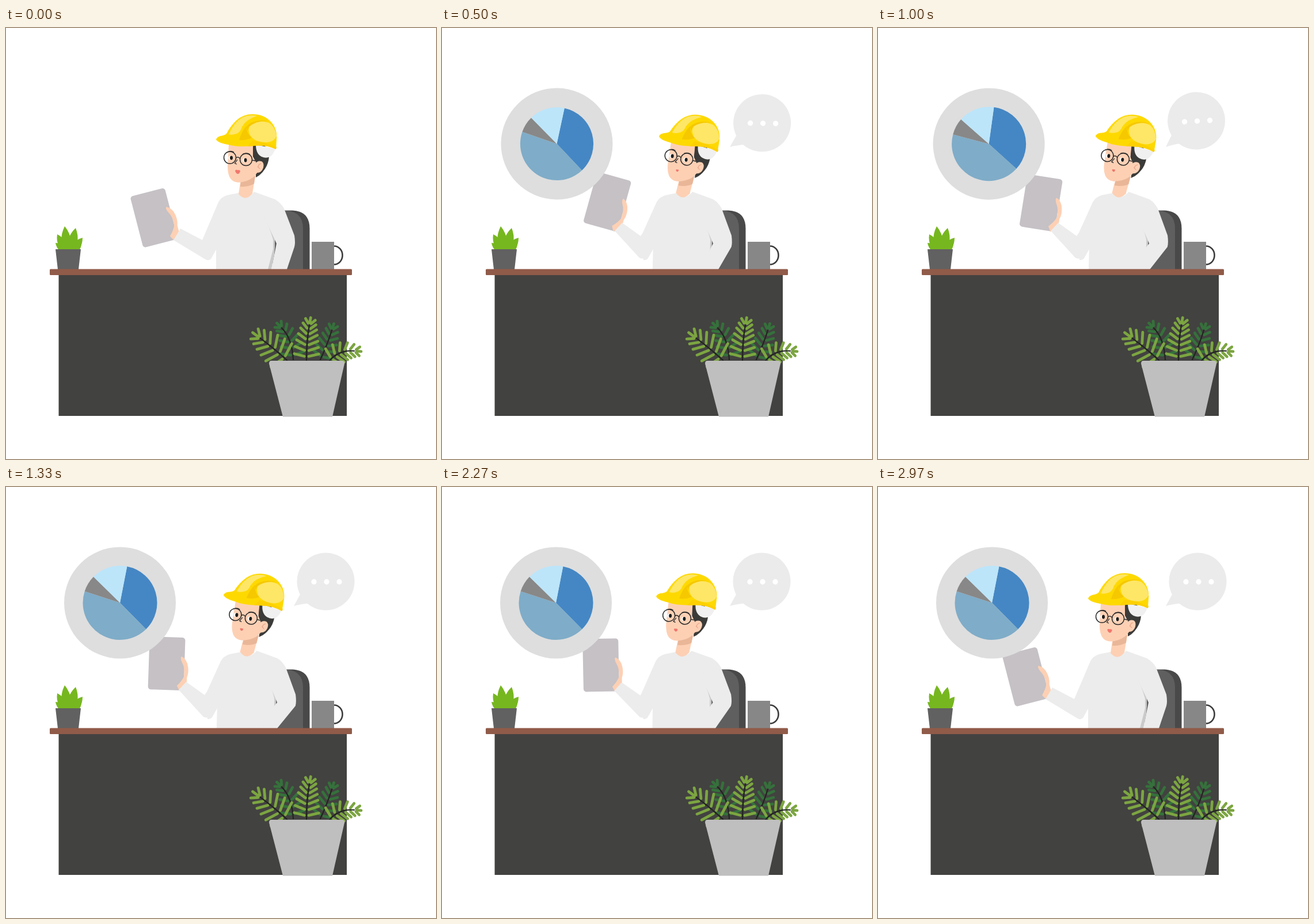
Animation, 747 px wide and 750 px high, one loop 3.01 s. Source, as an HTML page:

```html
<!DOCTYPE html>
<html lang="en">
<head>
<meta charset="utf-8">
<title>Engineer at a desk</title>
<style>
  html, body { margin: 0; width: 100%; height: 100%; overflow: hidden; background: #fff; }
  svg { display: block; width: 100vw; height: 100vh; }
</style>
</head>
<body>
<svg viewBox="0 0 747 750" xmlns="http://www.w3.org/2000/svg">
  <defs><clipPath id="chartClip"><path d="M71 0H747V750H71z"/></clipPath></defs>

  <g id="chair">
    <path d="M483 317.500H498Q527.500 319 527.500 349V420H483z" fill="#494949"/>
    <path d="M463 420V345Q465 318 486 318Q516 319 516 349V420z" fill="#5f5f5f"/>
  </g>

  <g id="hand">
    <rect x="247" y="262" width="62" height="92" rx="5" fill="#c5c1c5"/>
    <path d="M303 295Q310 297 314 307Q318 320 314 331L314 342L302 355L297 346Q306 337 309 329Q310 314 305 306Q301 299 303 295z" fill="#fdd0b4"/>
  </g>

  <g id="torso">
    <path d="M446 324L467 366V382L466 395L461 420H440z" fill="#cacaca"/>
    <path d="M404 287L384 291Q374 294 369 303L341 369L349 404Q355 404 357 400L365 385V420H455L464 385V368Q458 346 446 324L482 318Q478 304 467 298L431 285Q418 301 404 287z" fill="#ececec"/>
  </g>
  <path id="forearm" fill="#ececec"/>
  <path id="sleeve" fill="#ececec"/>

  <g id="head">
    <path d="M408 262L404 289Q416 303 428 288L433 257z" fill="#fdd0b4"/>
    <path d="M408 266L433 257L431 271Q421 277 407 276z" fill="#e9b698"/>
    <path d="M428 203L429 224L434 234L434 260Q443 256 450 245Q456 236 457 224L450 205z" fill="#3b3b39"/>
    <path d="M387 202L385 240Q385 262 396 267Q404 271 418 266Q432 261 437 250L434 233L429 224V203z" fill="#fdd0b4"/>
    <path d="M433 236Q437 230 444 232Q449 235 447 243Q444 252 436 252L433 255z" fill="#fdd0b4"/>
    <path d="M443 236Q438 237 438 243M437 241L441 245" fill="none" stroke="#e9a98d" stroke-width="1.3"/>
    <path d="M434 203Q434 219 444 224Q453 228 460 223Q465 219 468 210z" fill="#f0f0f0"/>

    <g id="eyesOpen">
      <ellipse cx="390" cy="226" rx="3.500" ry="3.500" fill="#fff"/>
      <ellipse cx="414.500" cy="230" rx="3.500" ry="3.500" fill="#fff"/>
      <ellipse cx="391.500" cy="226" rx="2.500" ry="3.400" fill="#1d1d1b"/>
      <ellipse cx="416" cy="230" rx="2.500" ry="3.400" fill="#1d1d1b"/>
    </g>
    <path id="eyesShut" d="M387 227Q391 230 395 228M411 231Q415 234 420 232" fill="none" stroke="#2b2b2b" stroke-width="1.5"/>
    <g fill="none" stroke="#2b2b2b" stroke-width="1.500">
      <circle cx="389" cy="225.500" r="10.500"/>
      <circle cx="417" cy="229" r="10.500"/>
      <path d="M399.500 226Q403 223 406.500 227M427.500 230L433 231"/>
      <path d="M402 229L397.500 235.500L401 237" stroke-width="1.300"/>
      <path d="M384 216.500Q390 212.500 396 216M411 219.500Q418 216 424 220" stroke-width="1.200"/>
    </g>
    <path id="mouth" d="M-4.500 -2Q-2 -4 0 -2.500Q3 -4 4.500 -1Q3 4 0 4Q-3.500 3 -4.500 -2z" fill="#f1776d"/>

    <path d="M365 194Q366 190 372 188Q379 187 383 184Q390 170 401 160Q413 150 428 150Q448 150 460 163Q472 176 470 194L469 211Q452 203 432 205Q402 208 386 203Q368 200 365 194z" fill="#fed900"/>
    <path d="M387 185Q396 164 410 156Q422 150 436 153Q417 159 410 172Q407 182 400 184Q392 187 387 185z" fill="#fee667"/>
    <path d="M425 188Q417 174 428 167Q441 159 457 165Q468 172 470 188Q466 198 453 199Q433 199 425 188z" fill="#fee667"/>
    <path d="M405 195Q409 181 417 171Q418 184 427 191Q417 196 405 195z" fill="#f5c800"/>
    <path d="M417 172Q430 157 458 162Q436 160 422 172Q419 178 421 182z" fill="#f5c800"/>
    <path d="M428 196Q452 199 470 207L469 211Q452 203 432 205L420 206z" fill="#fdd000"/>
  </g>

  <path d="M570 379.500A14.500 16 0 0 1 570 411.500" fill="none" stroke="#3b3b3b" stroke-width="2.600"/>
  <rect x="531" y="372" width="39" height="48" fill="#878787"/>

  <g id="succulent"></g>
  <path d="M86 385H130L126 420H90z" fill="#616161"/>

  <rect x="91.500" y="428" width="500.500" height="247" fill="#424240"/>
  <rect x="76" y="419.500" width="525" height="10.500" rx="1.500" fill="#905b49"/>

  <g id="ferns" fill="none" stroke-linecap="round"></g>
  <path d="M461 579H584Q589 579 588 584L567 676.500H481L457 584Q457 579 461 579z" fill="#bfbfbf"/>

  <g clip-path="url(#chartClip)">
    <g id="chart">
      <circle cy="-97.500" r="97" fill="#dedede"/>
      <g id="pie"></g>
    </g>
  </g>

  <g id="bubble">
    <circle cx="55.500" cy="-42.500" r="50" fill="#ebebeb"/>
    <path d="M0 0L11 -20L30 -5Q15 -4 0 0z" fill="#ebebeb"/>
    <g fill="#fff">
      <circle cx="35" cy="-42" r="4.700"/><circle cx="57" cy="-42" r="4.700"/><circle cx="79" cy="-42" r="4.700"/>
    </g>
  </g>
</svg>

<script>
const LOOP = 3010;
const el = id => document.getElementById(id);
const set = (id, name, value) => el(id).setAttribute(name, value);

function add(parent, attrs) {
  const path = document.createElementNS('http://www.w3.org/2000/svg', 'path');
  for (const name in attrs) path.setAttribute(name, attrs[name]);
  el(parent).append(path);
}

const mix = (a, b, p) => a + (b - a) * p;
const ramp = (t, from, to) => Math.min(1, Math.max(0, (t - from) / (to - from)));
const ease = (t, from, to) => { const p = ramp(t, from, to); return p * p * (3 - 2 * p); };

// Eased value through [time, value] keys.
function track(t, keys) {
  let value = keys[0][1];
  for (let i = 1; i < keys.length; i++) {
    value += (keys[i][1] - keys[i - 1][1]) * ease(t, keys[i - 1][0], keys[i][0]);
  }
  return value;
}

function addLeaf(x, y, tipX, tipY, width) {
  const dx = tipX - x, dy = tipY - y, len = Math.hypot(dx, dy);
  const nx = -dy / len * width, ny = dx / len * width;
  const mx = x + dx * 0.5, my = y + dy * 0.5;
  add('succulent', {
    d: `M${x} ${y}Q${mx + nx} ${my + ny} ${tipX} ${tipY}Q${mx - nx} ${my - ny} ${x} ${y}z`,
    fill: '#76b71f'
  });
}

// A curved stem with pairs of leaflets that lean more towards the tip as they near it.
function addFern([x0, y0, cx, cy, x1, y1], color, size, pairs) {
  let d = '';
  for (let i = 0; i <= pairs; i++) {
    const p = 0.1 + 0.9 * i / pairs, q = 1 - p;
    const x = q * q * x0 + 2 * q * p * cx + p * p * x1;
    const y = q * q * y0 + 2 * q * p * cy + p * p * y1;
    const dir = Math.atan2(q * (cy - y0) + p * (y1 - cy), q * (cx - x0) + p * (x1 - cx));
    const len = size * (1 - 0.4 * p * p);
    const lean = 1.4 - 0.7 * p;
    for (const a of i === pairs ? [-lean, 0, lean] : [-lean, lean]) {
      const ux = Math.cos(dir + a), uy = Math.sin(dir + a);
      d += `M${x + ux * 4} ${y + uy * 4}L${x + ux * len} ${y + uy * len}`;
    }
  }
  add('ferns', { d, stroke: color, 'stroke-width': 4.8 });
  add('ferns', { d: `M${x0} ${y0}Q${cx} ${cy} ${x1} ${y1}`, stroke: '#20231d', 'stroke-width': 2 });
}

function addSlice(from, to, fill) {
  const r = 64.5;
  const point = deg => `${r * Math.sin(deg * Math.PI / 180)} ${-r * Math.cos(deg * Math.PI / 180)}`;
  add('pie', { d: `M0 0L${point(from)}A${r} ${r} 0 0 1 ${point(to)}z`, fill });
}

addLeaf(107, 394, 89, 359, 14);
addLeaf(107, 394, 102, 345, 16);
addLeaf(111, 394, 121, 348, 16);
addLeaf(111, 394, 133, 365, 14);
addLeaf(107, 392, 86, 374, 11);
addLeaf(113, 392, 131, 376, 11);

const DARK = '#35713b', LIGHT = '#7ca541';
addFern([499, 577, 497, 540, 479, 522], DARK, 20, 5);
addFern([546, 577, 558, 552, 566, 526], DARK, 20, 5);
addFern([488, 578, 465, 557, 442, 540], LIGHT, 28, 5);
addFern([522, 579, 522, 545, 527, 517], LIGHT, 22, 6);
addFern([562, 579, 578, 560, 605, 562], LIGHT, 20, 5);

addSlice(11, 135.5, '#4587c4');
addSlice(135.5, 288, '#7facc8');
addSlice(288, 314.5, '#888');
addSlice(314.5, 371, '#bce5fa');

function draw(ms) {
  const t = ms / 1000;
  const lean = track(t, [[0, 0], [0.6, 1], [1.64, 1], [3, 0]]);
  const reach = track(t, [[0, 0], [0.52, 1], [2.1, 1], [3, 0]]);
  const tuck = ramp(t, 0, 1.08) * (1 - ease(t, 1.95, 3));
  const tilt = track(t, [[0, -14.5], [0.54, 16], [1.55, 0], [2.12, 0], [3, -14.5]]);

  const skew = -0.028 * lean;
  set('torso', 'transform', `matrix(1 0 ${skew} 1 ${-skew * 450} 0)`);
  set('head', 'transform', `rotate(${6.1 * lean} 427 312)`);
  set('hand', 'transform',
    `translate(${mix(-14, 0, reach)} ${mix(15, 0, reach)}) rotate(${tilt} 303 339)`);

  const m = (a, b) => mix(a, b, reach);
  set('forearm', 'd', `M${m(303, 313)} ${m(349, 339)}L${m(341, 345)} ${m(369, 362)}L368 330V380` +
    `L${m(358, 360)} ${m(398, 396)}Q${m(354, 352)} ${m(406, 404)} ${m(347, 343)} ${m(403, 400)}` +
    `L${m(291, 300)} ${m(369, 353)}z`);

  const s = 3 * lean;
  set('sleeve', 'd', `M${446 + s} 324L${470 + s * 0.4} 375L${mix(461, 432, tuck)} 420H${mix(488, 471, tuck)}` +
    `L${501 + s * 0.6} 381Q${503 + s * 0.6} 374 ${501 + s * 0.7} 361L${483 + s} 314` +
    `Q${478 + s} 304 ${467 + s} 299z`);

  const shut = t > 1.9 && t < 2.05;
  set('eyesOpen', 'visibility', shut ? 'hidden' : 'visible');
  set('eyesShut', 'visibility', shut ? 'visible' : 'hidden');
  const mouth = track(t, [[0, 1], [0.3, 0.58], [1.6, 0.65], [1.9, 0.9], [2.1, 0.9], [2.45, 0.58], [2.6, 0.58], [2.95, 0.95]]);
  set('mouth', 'transform', `translate(402.500 250) scale(${mouth})`);

  const swing = track(t, [[0, -84], [0.6, 7.5], [0.95, -3.5], [1.22, 0]]);
  set('chart', 'transform', `translate(198 299) rotate(${swing}) scale(${ease(t, 0, 0.42)})`);
  const grow = ease(t, 0.13, 0.53);
  set('pie', 'transform', `translate(0 -97.500) rotate(${15 * (1 - grow)}) scale(${grow})`);
  set('bubble', 'transform', `translate(500 207) rotate(${swing}) scale(${ease(t, 0, 0.5)})`);
}

const start = performance.now();
function tick() {
  draw((performance.now() - start) % LOOP);
  requestAnimationFrame(tick);
}
draw(0);
requestAnimationFrame(tick);
</script>
</body>
</html>
```
